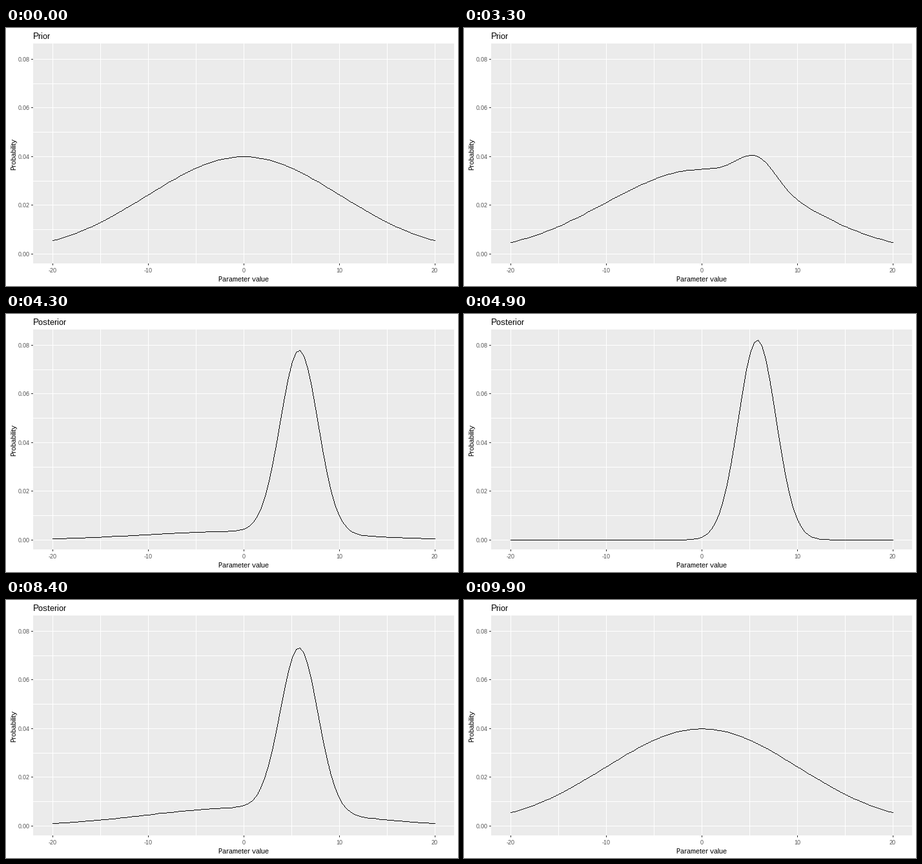
These frames come from a looping animation (700 by 400 pixels, 10000 ms). A matplotlib script:

```python
import numpy as np
import matplotlib.pyplot as plt
from matplotlib.animation import FuncAnimation
from matplotlib.patches import Rectangle

W, H = 700, 400
FRAMES, INTERVAL = 100, 100
MORPH = 25                      # frames per transition
TO_POSTERIOR, TO_PRIOR = 25, 75

plt.rcParams.update({
    "font.family": "Liberation Sans",
    "text.hinting": "native",
    "text.hinting_factor": 1,
})


def to_px(x):
    return np.round(368 + 14.815 * np.asarray(x)).astype(int)


def to_py(y):
    return np.round(349.765 - 3774 * np.asarray(y)).astype(int)


def normal(x, mean, sd):
    return np.exp(-((x - mean) / sd) ** 2 / 2) / (sd * np.sqrt(2 * np.pi))


# Normal prior, updated on a grid by a normal likelihood
theta = np.linspace(-20, 20, 100)
prior = normal(theta, 0, 10)
posterior = prior * normal(theta, 6, 2)
posterior /= posterior.sum()

fig = plt.figure(figsize=(W / 100, H / 100), dpi=100, facecolor="white")
ax = fig.add_axes([0, 0, 1, 1])


def box(x, y, w, h, color):
    ax.add_patch(Rectangle((x, y), w, h, facecolor=color, linewidth=0,
                           antialiased=False, zorder=1))


def label(x, y, text, px, color="black", **kw):
    kw.setdefault("ha", "center")
    return ax.text(x, y, text, fontsize=px * 0.72, color=color,
                   va="baseline", **kw)


def draw_panel():
    left, top, right, bottom = 42, 24, 694, 365
    box(left, top, right - left, bottom - top, "#EBEBEB")
    for x in to_px(np.arange(-20, 21, 5)):
        box(x, top, 1, bottom - top, "white")
    for y in to_py(np.arange(9) / 100):
        box(left, y, right - left, 1, "white")
    for v in range(-20, 21, 10):
        x = to_px(v)
        box(x, bottom, 1, 3, "#333333")
        label(x, 379, str(v), 9, "#4D4D4D")
    for v in np.arange(0, 9, 2) / 100:
        y = to_py(v)
        box(left - 3, y, 3, 1, "#333333")
        label(37, y + 4, f"{v:.2f}", 9, "#4D4D4D", ha="right")
    label(368, 393, "Parameter value", 11)
    label(15, 195.5, "Probability", 11, rotation=90, rotation_mode="anchor")


def trace(density):
    """One-pixel polyline without antialiasing, as an RGBA layer."""
    layer = np.zeros((H, W, 4), np.uint8)
    px, py = to_px(theta), to_py(density)
    for x0, y0, x1, y1 in zip(px, py, px[1:], py[1:]):
        n = max(abs(x1 - x0), abs(y1 - y0)) + 1
        xs = np.round(np.linspace(x0, x1, n)).astype(int)
        ys = np.round(np.linspace(y0, y1, n)).astype(int)
        layer[ys, xs, 3] = 255
    return layer


def cubic_in_out(p):
    p = min(max(p, 0), 1)
    return 4 * p ** 3 if p < 0.5 else 1 - 4 * (1 - p) ** 3


draw_panel()
title = label(42, 17, "Prior", 13, ha="left")
curve = ax.imshow(trace(prior), extent=(0, W, H, 0), aspect="auto",
                  interpolation="nearest", zorder=2)
ax.set_xlim(0, W)
ax.set_ylim(H, 0)
ax.axis("off")


def update(i):
    mix = (cubic_in_out((i - TO_POSTERIOR) / MORPH)
           - cubic_in_out((i - TO_PRIOR) / MORPH))
    curve.set_data(trace(prior + mix * (posterior - prior)))
    title.set_text("Posterior" if 37 <= i < 88 else "Prior")
    return curve, title


anim = FuncAnimation(fig, update, frames=FRAMES, interval=INTERVAL,
                     repeat=True, repeat_delay=0)
plt.show()
```
